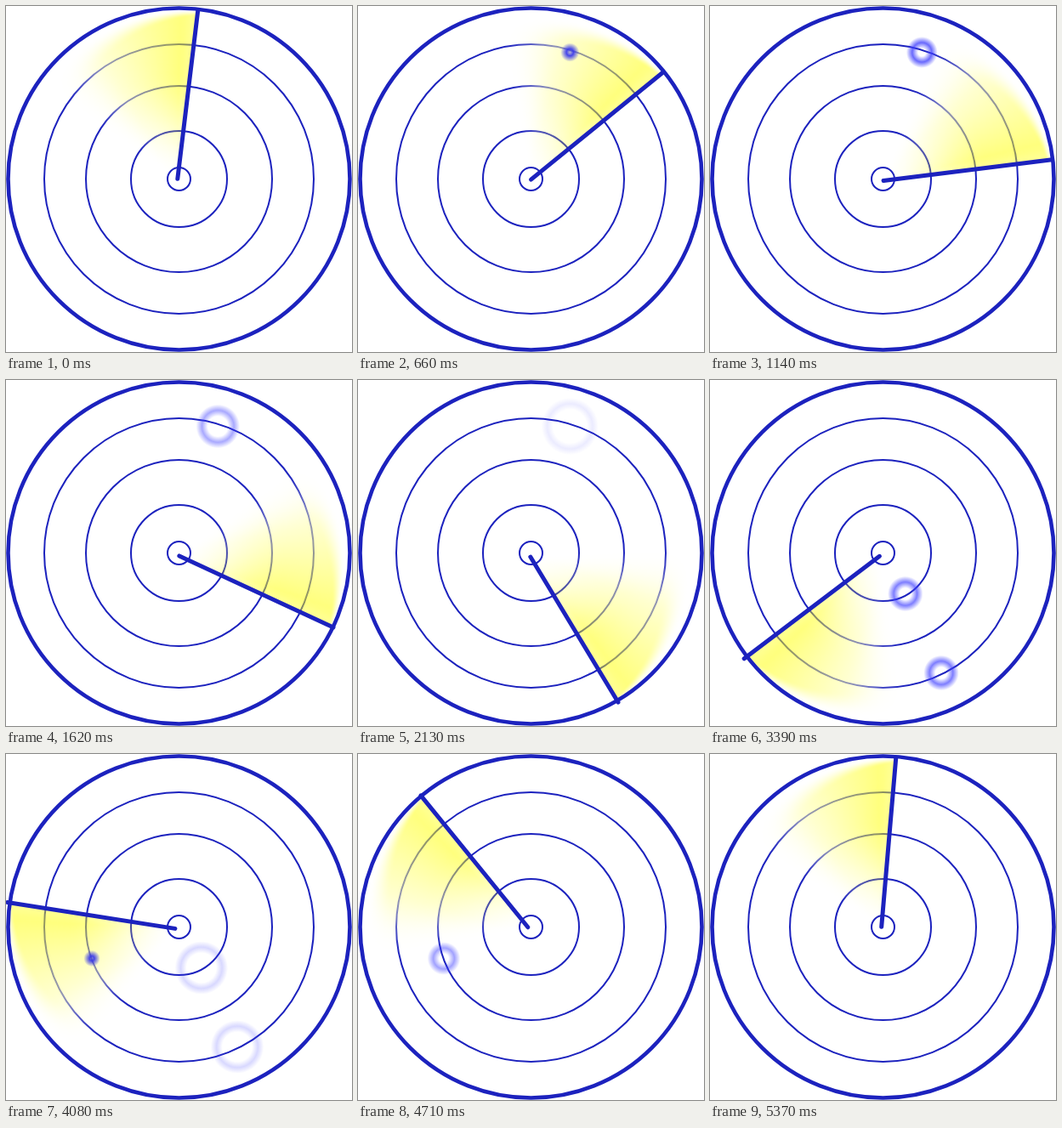
These frames come from a looping animation (407 px wide and 407 px high, 5400 ms). An HTML page with a canvas:

```html
<!DOCTYPE html>
<html lang="en">
<head>
<meta charset="utf-8">
<title>Radar</title>
<style>
  html, body { margin: 0; width: 100%; height: 100%; overflow: hidden; background: #fff; }
  canvas { display: block; }
</style>
</head>
<body>
<canvas id="radar" width="407" height="407"></canvas>
<script>
const SIZE = 407, MID = SIZE / 2;
const LOOP = 5400, STEP = 30;
const START_ANGLE = 6.9;
const PIVOT = { x: 201.5, y: 205.8 };
const BLUE = '#1c22be';
const RINGS = [13.5, 56.5, 109.5, 158.5];
const BLIPS = [
  { x: 249.3, y: 54.5, start: 0, life: 2280 },
  { x: 229.8, y: 251.5, start: 2100, life: 2280 },
  { x: 272, y: 344.5, start: 2100, life: 2280 },
  { x: 101, y: 240.5, start: 3510, life: 1750 }
];

const ctx = document.getElementById('radar').getContext('2d');
const clamp = v => Math.min(1, Math.max(0, v));
const smooth = (a, b, v) => {
  const t = clamp((v - a) / (b - a));
  return t * t * (3 - 2 * t);
};

// Glow trailing an upright hand: yellow at the hand, white towards the tail.
function makeGlow() {
  const canvas = document.createElement('canvas');
  canvas.width = canvas.height = SIZE;
  const g = canvas.getContext('2d');
  const image = g.createImageData(SIZE, SIZE);
  for (let y = 0; y < SIZE; y++) {
    for (let x = 0; x < SIZE; x++) {
      const dx = x + 0.5 - MID, dy = y + 0.5 - MID;
      const r = Math.hypot(dx, dy);
      const lag = -Math.atan2(dx, -dy) * 180 / Math.PI;
      if (lag < 0 || lag > 66) continue;
      const edge = 202 - lag * 0.2;
      const alpha = 0.53 * smooth(0, 130, r)
        * (1 - smooth(36, 65, lag))
        * (1 - smooth(edge - 6 - lag * 0.6, edge, r))
        * (0.75 + 0.25 * clamp(lag / 6));
      const yellow = Math.pow(clamp(1 - (lag - 4) / 62), 1.35);
      image.data.set([255, 255, 255 * (1 - Math.min(1, yellow)), 255 * alpha], (y * SIZE + x) * 4);
    }
  }
  g.putImageData(image, 0, 0);
  return canvas;
}

const glow = makeGlow();

function circle(r, width) {
  ctx.lineWidth = width;
  ctx.beginPath();
  ctx.arc(MID, MID, r, 0, Math.PI * 2);
  ctx.stroke();
}

function drawBlip({ x, y, start, life }, time) {
  const age = time - start;
  if (age < 0 || age >= life) return;
  const outer = 1 + age * 0.0153;
  const half = Math.min(7, outer);
  const peak = outer - half;
  const inner = Math.max(0, peak - half);
  const alpha = 0.9 * Math.min(1, 1.7 * (1 - age / life), 0.2 + age / 300);
  const tone = clamp(age / 1200);
  const color = a => `rgba(${40 + 20 * tone},${40 + 20 * tone},${215 + 40 * tone},${a})`;
  const fill = ctx.createRadialGradient(x, y, inner, x, y, outer);
  fill.addColorStop(0, color(alpha * clamp(1 - peak / half)));
  fill.addColorStop((peak - inner) / (outer - inner), color(alpha));
  fill.addColorStop(1, color(0));
  ctx.fillStyle = fill;
  ctx.beginPath();
  ctx.arc(x, y, outer, 0, Math.PI * 2);
  ctx.fill();
}

function drawHand() {
  ctx.lineWidth = 5;
  ctx.lineCap = 'round';
  ctx.beginPath();
  ctx.moveTo(0, -2.6);
  ctx.lineTo(0, -202.3);
  ctx.stroke();
}

function atPivot(angle, paint) {
  ctx.save();
  ctx.translate(PIVOT.x, PIVOT.y);
  ctx.rotate(angle);
  paint();
  ctx.restore();
}

function draw(elapsed) {
  const step = Math.floor((elapsed % LOOP) / STEP);
  const angle = (START_ANGLE + step * 360 * STEP / LOOP) * Math.PI / 180;
  ctx.fillStyle = '#fff';
  ctx.fillRect(0, 0, SIZE, SIZE);
  ctx.strokeStyle = BLUE;
  RINGS.forEach(r => circle(r, 2));
  atPivot(angle, () => ctx.drawImage(glow, -MID, -MID));
  circle(201, 4.6);
  BLIPS.forEach(blip => drawBlip(blip, step * STEP));
  atPivot(angle, drawHand);
}

const began = performance.now();
function tick() {
  draw(performance.now() - began);
  requestAnimationFrame(tick);
}
tick();
</script>
</body>
</html>
```
